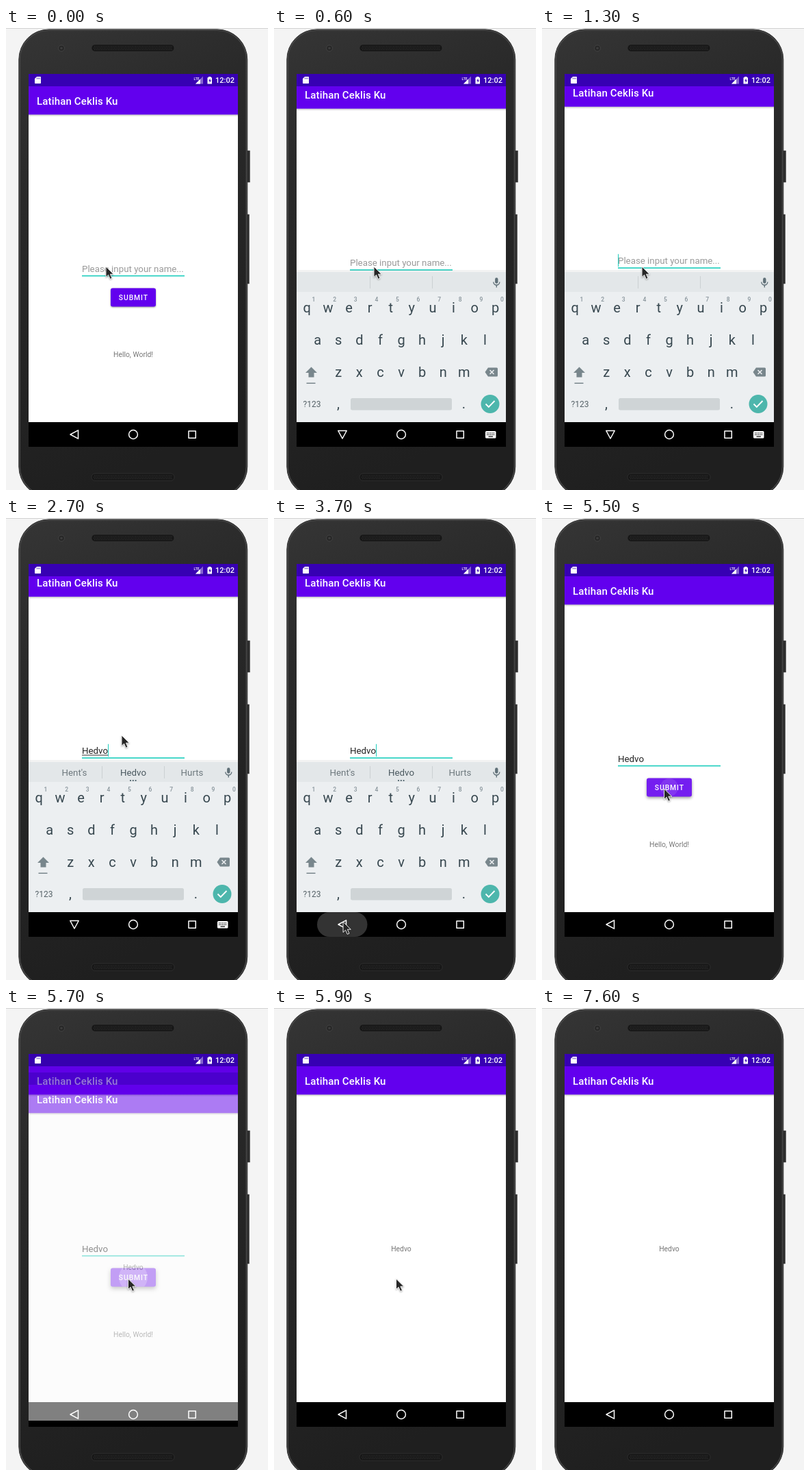
An HTML page that plays this animation: 383 by 674 pixels, repeating every 8000 ms.

```html
<!DOCTYPE html>
<html lang="id">
<head>
<meta charset="utf-8">
<style>
html, body { margin: 0; width: 100%; height: 100%; overflow: hidden; background: #f4f4f4; }
svg { display: block; font-family: Roboto, sans-serif; }
.mid { text-anchor: middle; }
.bold { font-weight: 500; }
#mouse { filter: drop-shadow(0 1px 1px #0005); }
</style>
</head>
<body>
<svg width="383" height="674" viewBox="0 0 383 674">
  <defs>
    <linearGradient id="body" x2="0.25" y2="1">
      <stop stop-color="#353535"/><stop offset=".3" stop-color="#2a2a2a"/><stop offset="1" stop-color="#1f1f1f"/>
    </linearGradient>
    <linearGradient id="shade" x2="0" y2="1">
      <stop stop-opacity=".25"/><stop offset="1" stop-opacity="0"/>
    </linearGradient>
    <clipPath id="screen"><rect x="33" y="67" width="306" height="544"/></clipPath>
    <clipPath id="button"><rect x="153" y="379.5" width="66" height="27" rx="3"/></clipPath>
    <g id="bar">
      <rect x="33" y="126" width="306" height="3.5" fill="url(#shade)"/>
      <rect x="33" y="85" width="306" height="41.3" fill="#6200ee"/>
      <text x="45" y="111.5" class="bold" font-size="15" letter-spacing=".15" fill="#fff">Latihan Ceklis Ku</text>
    </g>
    <g id="speaker">
      <rect x="125" y="24" width="121" height="10.5" rx="5" fill="#171717" stroke="#3a3a3a" stroke-width=".6"/>
      <path d="M129 27H243M128 29.3H243M129 31.6H243" stroke="#363636" stroke-dasharray="1.2 1.3"/>
    </g>
  </defs>

  <rect width="383" height="1" fill="#d2d2d2"/>
  <path d="M352 179h4.500v46h-4.500zM351 272h4.500v101h-4.500z" fill="#2c2c2c" stroke="#555" stroke-width=".6"/>
  <rect x="18.8" y="2" width="334" height="682" rx="44" fill="url(#body)" stroke="#3a3a3a"/>
  <rect x="20.3" y="3.5" width="331" height="679" rx="42.5" fill="none" stroke="#4a4a4a" stroke-width="1.2"/>
  <circle cx="81" cy="29.5" r="4.5" fill="#272727" stroke="#444"/>
  <circle cx="81" cy="29.5" r="1.8" fill="#3d3d3d"/>
  <use href="#speaker"/><use href="#speaker" y="626"/>

  <g clip-path="url(#screen)">
    <rect x="33" y="67" width="306" height="544"/>
    <rect x="33" y="67" width="306" height="508" fill="#fff"/>
    <g id="form">
      <use href="#bar"/>
      <text id="hint" x="111" y="355.6" font-size="13.3" fill="#999">Please input your name...</text>
      <text id="entry" x="111" y="355.6" font-size="13.3" fill="#222"></text>
      <rect id="compose" x="111" y="357" height="1" fill="#333"/>
      <rect x="111" y="360.8" width="150" height="1.6" fill="#1bcdbc"/>
      <rect id="caret" y="341.3" width="1" height="18.4" fill="#1bcdbc"/>
      <rect id="submit" x="153" y="379.5" width="66" height="27" rx="3" fill="#6200ee"/>
      <g id="pressed" fill="#fff" clip-path="url(#button)">
        <rect x="153" y="379" width="66" height="28" opacity=".24"/>
        <circle id="ripple" cx="186" cy="393" opacity=".24"/>
      </g>
      <text x="186.4" y="397" class="mid bold" font-size="10.35" letter-spacing=".92" fill="#fff">SUBMIT</text>
      <text x="186" y="479.5" class="mid" font-size="10.35" fill="#757575">Hello, World!</text>
    </g>
    <rect x="33" y="67" width="306" height="18" fill="#3700b3"/>

    <g id="keyboard">
      <rect x="33" y="353" width="306" height="4" opacity=".05"/>
      <rect x="33" y="356" width="306" height="219" fill="#eceff1"/>
      <rect x="33" y="356" width="306" height="29" fill="#e3e7e9"/>
      <path d="M140.5 362v18M231.5 362v18" stroke="#cbd0d2"/>
      <g id="words" class="mid" font-size="13.3" fill="#6d787d"></g>
      <path id="dots" d="M182 383h.01M185.8 383h.01M189.6 383h.01" stroke="#455a64" stroke-width="2.2" stroke-linecap="round"/>
      <g fill="none" stroke="#607078" stroke-width="1.4">
        <path d="M325.3 366.5v4" stroke-width="4.4" stroke-linecap="round"/>
        <path d="M320.8 370.5a4.5 4.5 0 0 0 9 0M325.3 375v3.5"/>
      </g>
      <g id="keys" class="mid" font-size="20" fill="#37474f"></g>
      <g fill="#78868c">
        <path d="M54.5 494.5l8.5 8.5h-4.5v6.5h-8V503H46zM47.5 517.5h13v1.6h-13z"/>
        <path d="M313 495.5h12.5q1.5 0 1.5 1.5v10q0 1.5-1.5 1.5H313l-4.5-6.5z"/>
      </g>
      <path d="M315.5 499l6 6m0-6l-6 6" stroke="#eceff1" stroke-width="1.5"/>
      <text x="55.5" y="553" class="mid" font-size="12" fill="#546066">?123</text>
      <rect x="112" y="540" width="148" height="17.5" rx="2.5" fill="#cfd4d6"/>
      <circle cx="316" cy="548.5" r="13.5" fill="#4db6ac"/>
      <path d="M309.5 548.5l4.3 4.3 8.7-8.8" fill="none" stroke="#fff" stroke-width="1.9"/>
    </g>
    <rect x="33" y="575" width="306" height="36"/>
    <rect id="dim" x="33" y="67" width="306" height="508"/>

    <g id="result">
      <rect x="33" y="67" width="306" height="508" fill="#fff"/>
      <use href="#bar"/>
      <rect x="33" y="67" width="306" height="18" fill="#3700b3"/>
      <text id="greeting" x="186" y="355" class="mid" font-size="10.35" fill="#757575"></text>
    </g>

    <g fill="#fff">
      <path d="M45 71h5.2q.8 0 .8.8v8.4q0 .8-.8.8h-7.4q-.8 0-.8-.8V74z"/>
      <path d="M45.300 72.5v2M47.3 72.5v2M49.2 72.5v2" stroke="#3700b3" stroke-width=".8"/>
      <text x="274.5" y="75.5" class="bold" font-size="5">LTE</text>
      <path d="M277 81.5h11v-11z" opacity=".4"/>
      <path d="M277 81.5h7v-7z"/>
      <path d="M296 71h3.5v1.2h1.5V81.5h-6.5V72.2h1.5z"/>
      <path d="M298.5 73.5l-2.3 3.8h1.5v2.7l2.2-3.8h-1.4z" fill="#3700b3"/>
      <text x="306" y="80" class="bold" font-size="11">12:02</text>
    </g>
    <rect id="press" x="63" y="575" width="73.5" height="36" rx="18" fill="#fff"/>
    <g fill="none" stroke="#fff" stroke-width="1.5" stroke-linejoin="round">
      <path id="back" d="M-6 0L5.5-6.2V6.2z"/>
      <circle cx="186" cy="593" r="6.4"/>
      <rect x="267" y="588" width="10.3" height="10.3"/>
    </g>
    <g id="switcher">
      <rect x="309" y="588" width="15.5" height="10.5" rx="1.5" fill="#fff"/>
      <path d="M311 590.8h12M311 593.3h12" stroke="#000" stroke-width="1.2" stroke-dasharray="1.3 1.15"/>
      <path d="M313.5 596h6.5" stroke="#000" stroke-width="1.2"/>
    </g>
  </g>
  <path id="mouse" d="M0 0V15.5L3.6 12.2 6.2 18.3 9 17.1 6.4 11.2H11.3z" fill="#262626" stroke="#fff" stroke-width=".9"/>
</svg>
<script>
const LOOP = 8000, NAME = "Hedvo";
const $ = id => document.getElementById(id);
const label = (parent, x, y, text, attrs = "") =>
  parent.insertAdjacentHTML("beforeend", `<text x="${x}" y="${y}" ${attrs}>${text}</text>`);

["qwertyuiop", "asdfghjkl", "zxcvbnm"].forEach((row, r) =>
  [...row].forEach((key, i) => {
    const x = 48.3 + 15.3 * [0, 1, 3][r] + 30.6 * i;
    label($("keys"), x, 415.4 + 46.7 * r, key);
    if (!r) label($("keys"), x + 9.7, 399, (i + 1) % 10, 'font-size="8.5" class="bold" fill="#87939a"');
  }));
label($("keys"), 94, 555, ",");
label($("keys"), 277.5, 555, ".");
[100, 186, 272].forEach((x, i) => label($("words"), x, 376.4, "", i == 1 ? 'fill="#4a585f"' : ""));
$("greeting").textContent = NAME;

// start time, letters typed, suggestions
const typing = [
  [0, 0, ["", "", ""]],
  [1800, 1, ["He", "H", "Hi"]],
  [1900, 2, ["Her", "He", "Hey"]],
  [2000, 3, ["Held", "Hed", "Her"]],
  [2200, 5, ["Head", NAME, "Hero"]],
  [2400, 5, ["Hent's", NAME, "Hurts"]]
];
const caretOn = [[1300, 3200], [3700, 4200], [4800, 5300]];
const mousePath = [
  [0, 146, 348], [2600, 146, 348], [2700, 169, 317], [2900, 169, 317],
  [3500, 101, 589], [3900, 101, 589], [4400, 177, 404], [4500, 177, 397],
  [4600, 178.5, 395], [7100, 178.5, 395], [7200, 170, 402], [7500, 7, 336]
];

const ramp = (t, a, b) => Math.min(1, Math.max(0, (t - a) / (b - a)));
const smooth = k => k * k * (3 - 2 * k);
const easeOut = k => 1 - (1 - k) ** 2;
const set = (id, attrs) => { for (const k in attrs) $(id).setAttribute(k, attrs[k]); };
const shift = (x, y) => `translate(${x} ${y})`;

function mouseAt(t) {
  const i = mousePath.findLastIndex(p => p[0] <= t);
  const a = mousePath[i], b = mousePath[i + 1] || a;
  const k = smooth(ramp(t, a[0], b[0] + (a === b)));
  return shift(a[1] + (b[1] - a[1]) * k, a[2] + (b[2] - a[2]) * k);
}

function draw(t) {
  const [, count, words] = typing.findLast(s => s[0] <= t);
  $("entry").textContent = NAME.slice(0, count);
  set("hint", { opacity: count ? 0 : 1 });
  const width = count ? $("entry").getComputedTextLength() : 0;
  set("compose", { width: t < 3700 ? width : 0 });
  set("caret", { x: Math.round(111 + width), opacity: +caretOn.some(([a, b]) => t >= a && t < b) });
  [...$("words").children].forEach((el, i) => el.textContent = words[i]);
  set("dots", { opacity: count ? 1 : 0 });

  const pan = easeOut(ramp(t, 400, 800)) - easeOut(ramp(t, 3800, 4200));
  set("form", { transform: shift(0, -11.5 * pan) });
  const up = easeOut(ramp(t, 250, 550)) - ramp(t, 3700, 3950);
  set("keyboard", { transform: shift(0, 22 * (1 - up)), opacity: up });

  const open = t < 3700 ? smooth(ramp(t, 200, 600)) : 0;
  set("back", { transform: `translate(100 593) rotate(${-90 * open})` });
  set("switcher", { opacity: open });
  set("press", { opacity: t < 3700 ? 0 : 0.2 * (1 - ramp(t, 3700, 4100)) });

  const push = ramp(t, 5400, 5600);
  set("pressed", { opacity: push });
  set("ripple", { r: 9 + 12 * ramp(t, 5400, 5700) });
  $("submit").style.filter = `drop-shadow(0 ${1 + 2 * push}px ${1 + 2 * push}px #0006)`;

  const enter = ramp(t, 5500, 5900);
  set("dim", { opacity: 0.05 * enter });
  set("result", { opacity: enter, transform: shift(0, 43.5 * (1 - enter ** 1.4)) });
  set("mouse", { transform: mouseAt(t), opacity: t < 7600 ? 1 : 0 });
}

function tick(now) {
  draw(Math.floor(now % LOOP / 100) * 100);
  requestAnimationFrame(tick);
}
draw(0);
requestAnimationFrame(tick);
</script>
</body>
</html>
```
